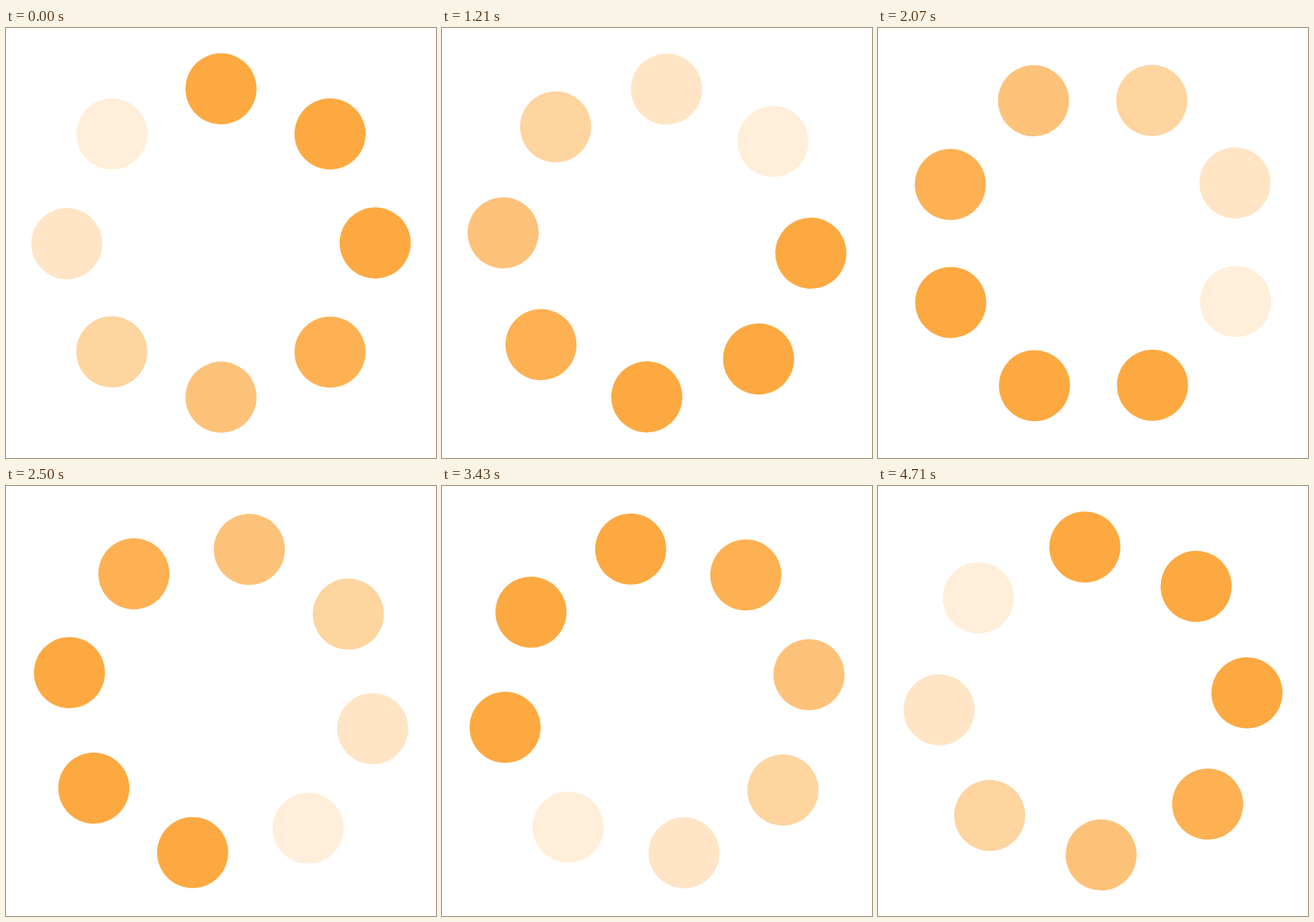
An HTML page for the animation above (4780 ms loop, 640x640 px).

```html
<!DOCTYPE html>
<html lang="en">
<meta charset="utf-8">
<title>Spinner</title>
<style>
  html, body { margin: 0; height: 100%; overflow: hidden; background: #fff; }
  svg { display: block; width: 100%; height: 100%; }
</style>
<svg viewBox="-320 -320 640 640"><g id="ring" fill="#fda941"></g></svg>
<script>
  const LOOP = 4780, POSES = 119;
  const ring = document.getElementById('ring');

  // Clockwise from the left; the faintest dot leads to the upper left.
  const opacities = [.3, .2, 1, 1, 1, .9, .7, .5];
  const nudges = [-.25, 0, 0, 0, 0, 0, 0, .1];
  ring.innerHTML = opacities.map((opacity, i) =>
    `<circle cx="-229.5" r="52.9" opacity="${opacity}" transform="rotate(${i * 45 + nudges[i]})"/>`
  ).join('');

  // Steps at 14 per second, on 10 ms ticks, through a turn of 25 poses per second.
  function draw(now) {
    const tick = Math.floor((now % LOOP) / 10);
    const step = Math.floor((tick + .5) * .14);
    const pose = Math.ceil(step * 25 / 14);
    ring.setAttribute('transform', `rotate(${pose * 360 / POSES})`);
    requestAnimationFrame(() => draw(performance.now() - start));
  }

  const start = performance.now();
  draw(0);
</script>
</html>
```
